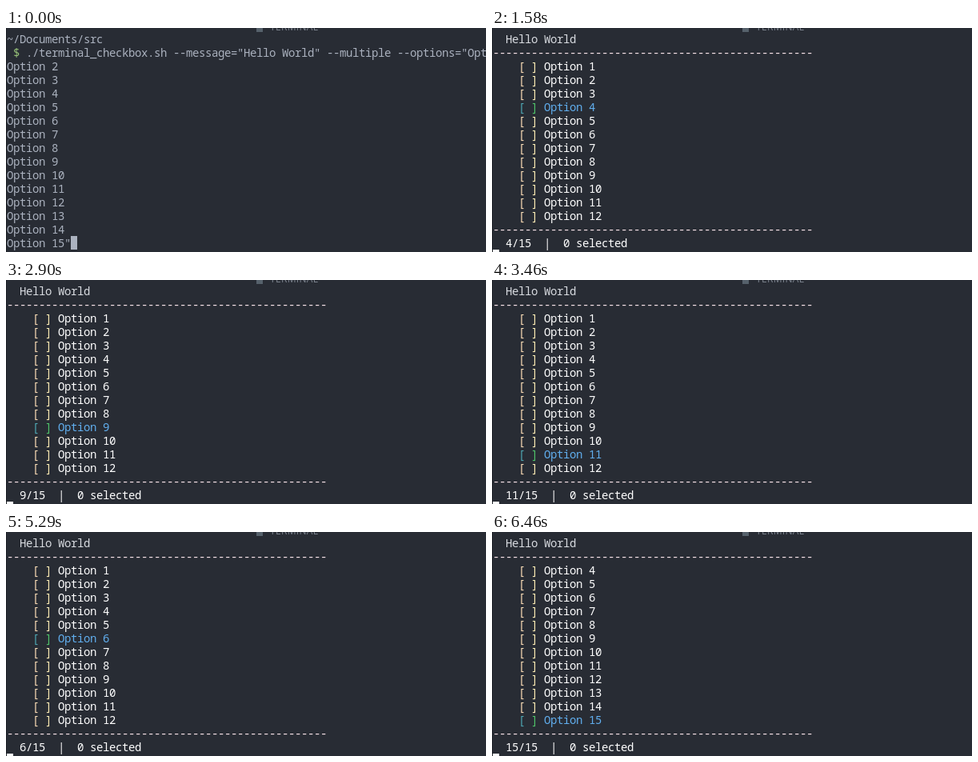
An HTML page that plays this animation: 600x280 px, repeating every 8 s.

```html
<!DOCTYPE html>
<html lang="en">
<head>
<meta charset="utf-8">
<title>Terminal checkbox</title>
<style>
  html, body { margin: 0; width: 100%; height: 100%; overflow: hidden; background: #282c34; }
  #stage { position: relative; width: 600px; height: 280px; overflow: hidden; }
  #edge { position: absolute; width: 1px; height: 280px; background: #1d2026; }
  #icon { position: absolute; left: 313px; width: 8px; height: 5px; background: #56616b; }
  #tab { position: absolute; left: 330px; top: -9px; font: 12px/16px "Open Sans", sans-serif; letter-spacing: .3px; color: #7d848f; }
  #screen {
    position: absolute; left: 1px; top: 5px; margin: 0; color: #abb2bf;
    font: 14px/17px "Noto Sans Mono", "DejaVu Sans Mono", monospace;
    letter-spacing: calc(8px - 1ch); font-variant-ligatures: none;
  }
  #cursor { position: absolute; width: 8px; height: 17px; }
  .prompt { color: #98c379; }
  .title { color: #d9dce1; }
  .rule { color: #f8e3e8; }
  .text { color: #fff; }
  .open { color: #ffdfb8; }
  .close { color: #ffedb5; }
  .active .text { color: #61afef; }
  .active .open { color: #4fa9b5; }
  .active .close { color: #4fc46a; }
</style>
</head>
<body>
<div id="stage">
  <div id="edge"></div>
  <div id="icon"></div>
  <div id="tab">TERMINAL</div>
  <div id="cursor"></div>
  <pre id="screen"></pre>
</div>
<script>
const LOOP = 8000, TOTAL = 15, VISIBLE = 12;
// [start in ms, selected option]; 0 is the command prompt
const steps = [
  [0, 0], [500, 1], [1000, 2], [1270, 3], [1580, 4], [1830, 5], [2070, 6], [2360, 7],
  [2640, 8], [2900, 9], [3160, 10], [3460, 11], [4360, 6], [4840, 1], [5290, 6],
  [5650, 11], [6460, 15]
];
const screen = document.getElementById('screen');
const cursor = document.getElementById('cursor');
const span = (cls, text) => `<span class="${cls}">${text}</span>`;
const range = (from, count) => Array.from({ length: count }, (_, i) => from + i);

function promptView() {
  const command = './terminal_checkbox.sh --message="Hello World" --multiple --options="Option 1';
  const options = range(2, TOTAL - 1).map(n => 'Option ' + n).join('\n');
  return `~/Documents/src\n ${span('prompt', '$')} ${command}\n${options}"`;
}

function menuView(selected, fresh) {
  const first = Math.max(1, selected - VISIBLE + 1);
  const rule = span('rule', '-'.repeat(50));
  const rows = range(first, VISIBLE).map(n => {
    const row = `    ${span('open', '[')} ${span('close', ']')} ${span('text', 'Option ' + n)}`;
    return n === selected ? span('active', row) : row;
  });
  const title = '  ' + span(fresh ? '' : 'title', 'Hello World');
  const status = span('text', `  ${selected}/${TOTAL}  |  0 selected`);
  return [title, rule, ...rows, rule, status].join('\n');
}

function placeCursor(column, row, color) {
  cursor.style.left = 1 + column * 8 + 'px';
  cursor.style.top = 5 + row * 17 + 'px';
  cursor.style.background = color;
}

let shown = -1;
function draw(now) {
  const time = now % LOOP;
  const index = steps.filter(([start]) => start <= time).length - 1;
  if (index !== shown) {
    shown = index;
    const selected = steps[index][1], fresh = index === 1;
    screen.innerHTML = selected ? menuView(selected, fresh) : promptView();
    if (selected) placeCursor(0, 16, fresh ? '#abb2bf' : '#fff');
    else placeCursor(10, 15, '#abb2bf');
  }
  requestAnimationFrame(draw);
}
const origin = performance.now();
(function start() { draw(0); })();
function tick() { draw(performance.now() - origin); }
</script>
</body>
</html>
```
